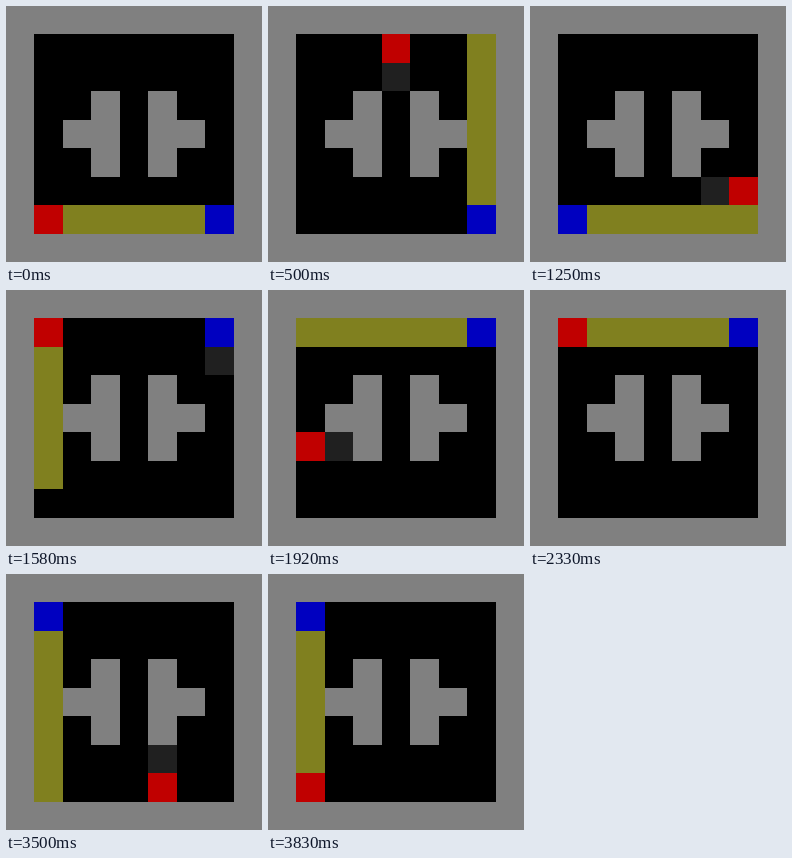
Animation of 256 by 256 pixels, one loop 3910 ms. Source, as an HTML page with a canvas:

```html
<!DOCTYPE html>
<html lang="en">
<head>
<meta charset="utf-8">
<title>Grid chase</title>
<style>
  html, body { margin: 0; width: 100%; height: 100%; overflow: hidden; background: #808080; }
  canvas { display: block; width: 256px; height: 256px; }
</style>
</head>
<body>
<canvas id="stage" width="256" height="256"></canvas>
<script>
const ctx = document.getElementById('stage').getContext('2d');
const LOOP = 3910, RATE = 0.012, CELLS = 9;
const COLOR = { wall: '#808080', floor: '#000000', front: '#202020',
                beam: '#80801f', red: '#c00000', blue: '#0000c0' };
const DIR = { U: [0, -1], D: [0, 1], L: [-1, 0], R: [1, 0], '-': [0, 0] };

const MAP = [
  '#########',
  '#.......#',
  '#.......#',
  '#..#.#..#',
  '#.##.##.#',
  '#..#.#..#',
  '#.......#',
  '#.......#',
  '#########'
];

// first tick, red cell, red move, red facing, blue cell, blue facing, beam on, beam origin and direction
const LEGS = [
  [0,  '17', 'U', 'R', '77', 'L', 1],
  [3,  '71', 'L', 'D', '77', 'U', 1],
  [10, '12', 'D', 'D', '77', 'L', 1],
  [14, '77', 'U', 'L', '17', 'R', 1],
  [19, '11', '-', 'D', '71', 'D', 1, '17', 'U'],
  [20, '12', 'D', 'R', '71', 'D', 0],
  [21, '13', 'D', 'R', '71', 'L', 0],
  [22, '14', 'D', 'R', '71', 'L', 1],
  [26, '27', 'R', 'U', '71', 'L', 1],
  [28, '11', '-', 'R', '71', 'L', 1],
  [29, '11', '-', 'D', '71', 'L', 1],
  [30, '11', '-', 'R', '71', 'L', 1],
  [32, '11', '-', 'D', '71', 'L', 1],
  [34, '17', 'R', 'U', '71', 'L', 1],
  [37, '77', '-', 'U', '71', 'D', 1],
  [39, '67', '-', 'U', '71', 'D', 1],
  [40, '77', 'L', 'U', '11', 'D', 1]
];

const cell = s => [+s[0], +s[1]];
const move = ([x, y], d, n = 1) => [x + DIR[d][0] * n, y + DIR[d][1] * n];
const same = (a, b) => a[0] === b[0] && a[1] === b[1];
const isWall = ([x, y]) => MAP[y][x] === '#';
const edge = i => Math.round(i * 256 / CELLS);

function fill([x, y], color) {
  ctx.fillStyle = color;
  ctx.fillRect(edge(x), edge(y), edge(x + 1) - edge(x), edge(y + 1) - edge(y));
}

function drawFront(pos, dir) {
  const front = move(pos, dir);
  if (!isWall(front)) fill(front, COLOR.front);
}

// The beam runs until it meets a wall or the red player.
function drawBeam(from, dir, red) {
  for (let p = move(from, dir); !isWall(p) && !same(p, red); p = move(p, dir)) {
    fill(p, COLOR.beam);
  }
}

function draw(tick) {
  const leg = LEGS.filter(l => l[0] <= tick).pop();
  const [start, redStart, step, look, blueCell, aim, firing, origin = blueCell, shot = aim] = leg;
  const red = move(cell(redStart), step, tick - start);
  const blue = cell(blueCell);

  for (let y = 0; y < CELLS; y++)
    for (let x = 0; x < CELLS; x++)
      fill([x, y], isWall([x, y]) ? COLOR.wall : COLOR.floor);

  drawFront(red, look);
  drawFront(blue, aim);
  if (firing) drawBeam(cell(origin), shot, red);
  fill(red, COLOR.red);
  fill(blue, COLOR.blue);
}

const begin = performance.now();
function frame() {
  const t = (performance.now() - begin) % LOOP;
  draw(Math.floor((Math.floor(t / 10) * 10 + 5) * RATE));
  requestAnimationFrame(frame);
}
frame();
</script>
</body>
</html>
```
